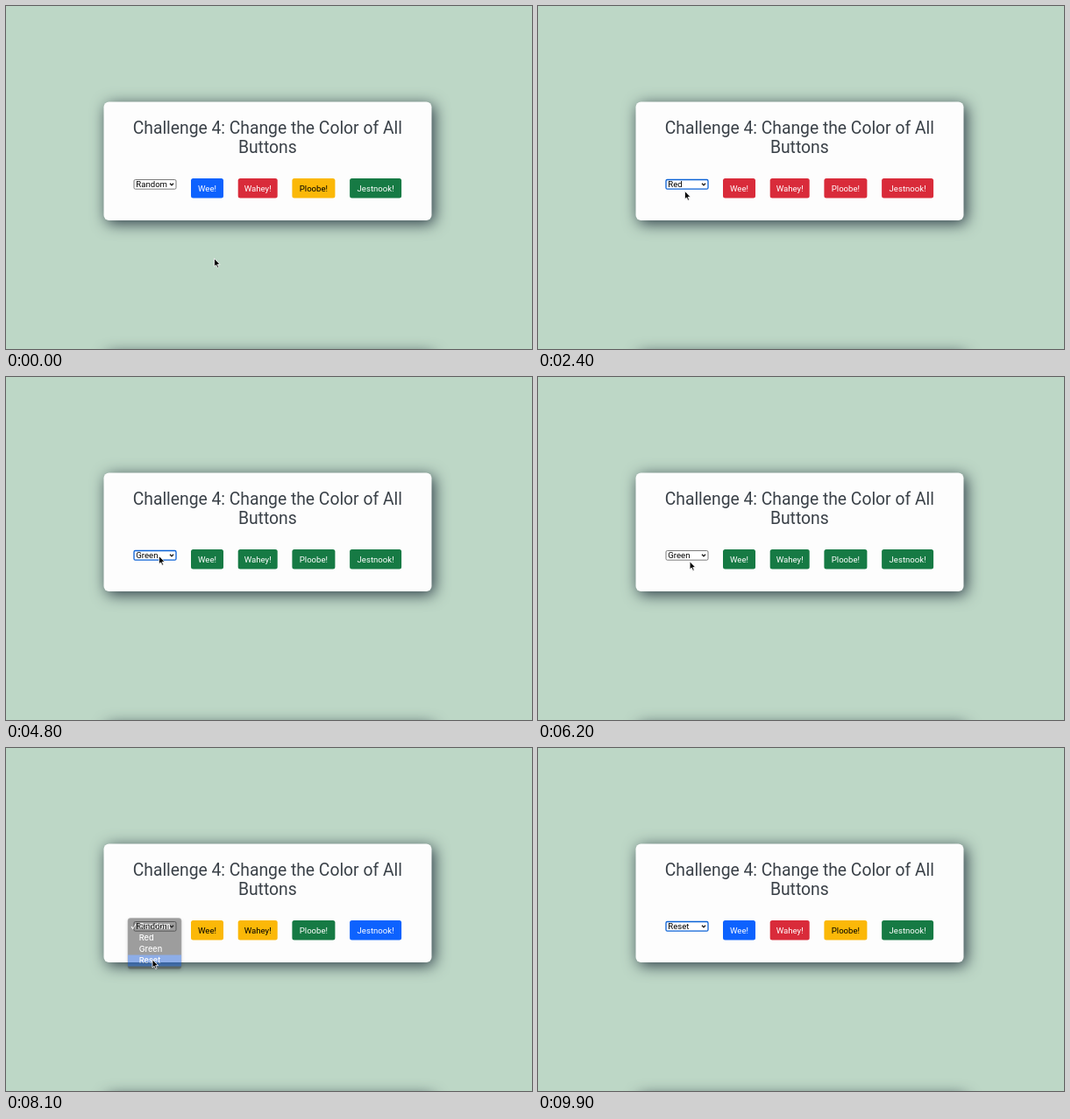
Animation of 600x392 px, one loop 9950 ms. Source, as an HTML page:

```html
<!DOCTYPE html>
<html lang="en">
<head>
<meta charset="utf-8">
<title>Change the Color of All Buttons</title>
<style>
  html, body { margin: 0; width: 100%; height: 100%; overflow: hidden; background: #bdd7c6; }
  svg { display: block; width: 100vw; height: 100vh; }
  text { font-family: Roboto, sans-serif; }
  .title { font-size: 19.3px; fill: #3a4148; text-anchor: middle; }
  .label { font-size: 9.6px; text-anchor: middle; }
  .value { font-size: 9.6px; fill: #000; }
  .option { font: 500 9.2px Inter, sans-serif; fill: #fff; }
</style>
</head>
<body>
<svg viewBox="0 0 600 392">
  <defs>
    <filter id="cardShadow" filterUnits="userSpaceOnUse" x="40" y="40" width="520" height="560" color-interpolation-filters="sRGB">
      <feDropShadow dx="3" dy="3.5" stdDeviation="8.5" flood-color="#2b3a45"/>
    </filter>
    <filter id="menuShadow" x="-30%" y="-30%" width="160%" height="160%" color-interpolation-filters="sRGB">
      <feDropShadow dx="0" dy="1.5" stdDeviation="2" flood-color="#000" flood-opacity=".25"/>
    </filter>
  </defs>
  <rect width="600" height="392" fill="#bdd7c6"/>
  <g fill="#fdfdfd" filter="url(#cardShadow)">
    <rect x="111.5" y="109.5" width="374" height="135.5" rx="6"/>
    <rect x="111.5" y="394.5" width="374" height="135.5" rx="6"/>
  </g>
  <text class="title" x="298.3" y="146">Challenge 4: Change the Color of All</text>
  <text class="title" x="298.3" y="168.3">Buttons</text>
  <g id="buttons"></g>
  <rect id="box" x="146" y="198.5" width="48" height="10.7" rx="1.5" fill="#fff"/>
  <text id="value" class="value" x="148.3" y="207.3"></text>
  <path d="M187 202.8l2 2.1 2-2.1" fill="none" stroke="#111" stroke-width="1.3"/>
  <g id="menu">
    <rect x="139" width="61" height="58" rx="3" fill="#2d2d2d" stroke="#555" stroke-width=".6" filter="url(#menuShadow)"/>
    <rect id="bar" x="139" width="61" height="13" fill="#0b50d0"/>
    <path id="tick" d="M143 0.3l1.8 2.4 3.2-5.2" fill="none" stroke="#fff" stroke-width="1.1"/>
    <g id="options"></g>
  </g>
  <path id="cursor" d="M0 0v9.3l2.1-1.9 1.5 3.3 1.5-.7-1.4-3.2h2.9z" fill="#000" stroke="#fff" stroke-width=".8" stroke-linejoin="round"/>
</svg>
<script>
const LOOP = 9950;
const ROW = 13, PAD = 3, MENU_TOP = 194.5;
const BLINK = 70, HOLD = 120, FADE = 150;
const CLICK_AWAY = 5600;
const OPTIONS = ["Random", "Red", "Green", "Reset"];
const BLUE = [13, 98, 254], RED = [217, 43, 58], GOLD = [251, 184, 8], GREEN = [22, 122, 68];
const START = [BLUE, RED, GOLD, GREEN];
const LABELS = { "Wee!": 37, "Wahey!": 45, "Ploobe!": 49, "Jestnook!": 59 };

const $ = id => document.getElementById(id);
const clamp = v => Math.max(0, Math.min(1, v));
const mix = (a, b, k) => a + (b - a) * k;
const ease = k => k * k * (3 - 2 * k);

function add(parent, tag, attrs, text = "") {
  const el = document.createElementNS("http://www.w3.org/2000/svg", tag);
  for (const key in attrs) el.setAttribute(key, attrs[key]);
  el.textContent = text;
  return parent.appendChild(el);
}

// Every choice runs the same way: menu opens, click, blink, fade, new value
let chosen = 0;
function pick(open, click, to, colors) {
  const from = chosen;
  chosen = to;
  return { open, click, from, to, colors, fade: click + HOLD, set: click + HOLD + FADE };
}
const picks = [
  pick(850, 1520, 1, START.map(() => RED)),
  pick(2700, 3590, 2, START.map(() => GREEN)),
  pick(6500, 6800, 0, [GOLD, GOLD, GREEN, BLUE]),
  pick(7450, 7900, 3, START)
];

// Pointer stops with arrival times; longer moves take longer
const stops = picks.flatMap(p => [
  { t: p.open - 100, x: 168, y: 205 },
  { t: p.click - 70, x: 167, y: 204 + 12.6 * (p.to - p.from) }
]).concat(
  { t: 0, x: 237.5, y: 288.5 },
  { t: 4600, x: 174.5, y: 204.5 },
  { t: CLICK_AWAY - 80, x: 198, y: 147 },
  { t: 6050, x: 176.5, y: 214.5 },
  { t: 9350, x: 508, y: -14 }
).sort((a, b) => a.t - b.t);

function pointer(t) {
  const i = stops.findIndex(s => s.t > t);
  if (i < 0) return stops[stops.length - 1];
  const a = stops[i - 1], b = stops[i];
  const time = Math.min(b.t - a.t, 350 + 1.5 * Math.hypot(b.x - a.x, b.y - a.y));
  const k = ease(clamp(1 - (b.t - t) / time));
  return { x: mix(a.x, b.x, k), y: mix(a.y, b.y, k) };
}

let left = 211;
const buttons = Object.entries(LABELS).map(([name, width]) => {
  const face = add($("buttons"), "rect", { x: left, y: 197, width, height: 22.5, rx: 2.5 });
  const label = add($("buttons"), "text", { class: "label", x: left + width / 2, y: 211.5 }, name);
  left += width + 16.7;
  return { face, label };
});
OPTIONS.forEach((name, i) => add($("options"), "text", { class: "option", x: 151.7, y: 12.3 + ROW * i }, name));

function drawButtons(t, done) {
  const last = done[done.length - 1], before = done[done.length - 2];
  const past = before ? before.colors : START;
  const next = last ? last.colors : START;
  const k = last ? clamp((t - last.set) / 150) : 1;
  const ink = c => c === GOLD ? 0 : 255;
  buttons.forEach(({ face, label }, i) => {
    const shade = mix(ink(past[i]), ink(next[i]), k);
    face.setAttribute("fill", `rgb(${past[i].map((c, n) => mix(c, next[i][n], k))})`);
    label.setAttribute("fill", `rgb(${shade},${shade},${shade})`);
  });
}

function drawSelect(t, done) {
  const last = done[done.length - 1];
  const blurs = [CLICK_AWAY, ...picks.map(p => p.open)].filter(b => b <= t);
  const focus = last && last.set > Math.max(...blurs);
  $("value").textContent = OPTIONS[last ? last.to : 0];
  $("box").setAttribute("stroke", focus ? "#0b62d6" : "#6c6c6c");
  $("box").setAttribute("stroke-width", focus ? 1.3 : 0.9);
}

function drawMenu(t, y) {
  const p = picks.find(p => t >= p.open && t < p.set);
  $("menu").style.display = p ? "" : "none";
  if (!p) return;
  const top = MENU_TOP - ROW * p.from;
  const hover = Math.floor((y - top - PAD) / ROW);
  const row = t < p.click ? Math.max(0, Math.min(OPTIONS.length - 1, hover)) : p.to;
  const blink = t >= p.click && t < p.click + BLINK;
  $("menu").setAttribute("transform", `translate(0 ${top})`);
  $("menu").setAttribute("opacity", 1 - clamp((t - p.fade) / FADE));
  $("bar").setAttribute("y", PAD + ROW * row);
  $("bar").style.display = blink ? "none" : "";
  $("tick").setAttribute("transform", `translate(0 ${9.3 + ROW * p.from})`);
}

function draw(t) {
  const { x, y } = pointer(t);
  const done = picks.filter(p => t >= p.set);
  drawButtons(t, done);
  drawSelect(t, done);
  drawMenu(t, y);
  $("cursor").setAttribute("transform", `translate(${x} ${y})`);
}

const began = performance.now();
function frame() {
  draw((performance.now() - began) % LOOP);
  requestAnimationFrame(frame);
}
frame();
</script>
</body>
</html>
```
